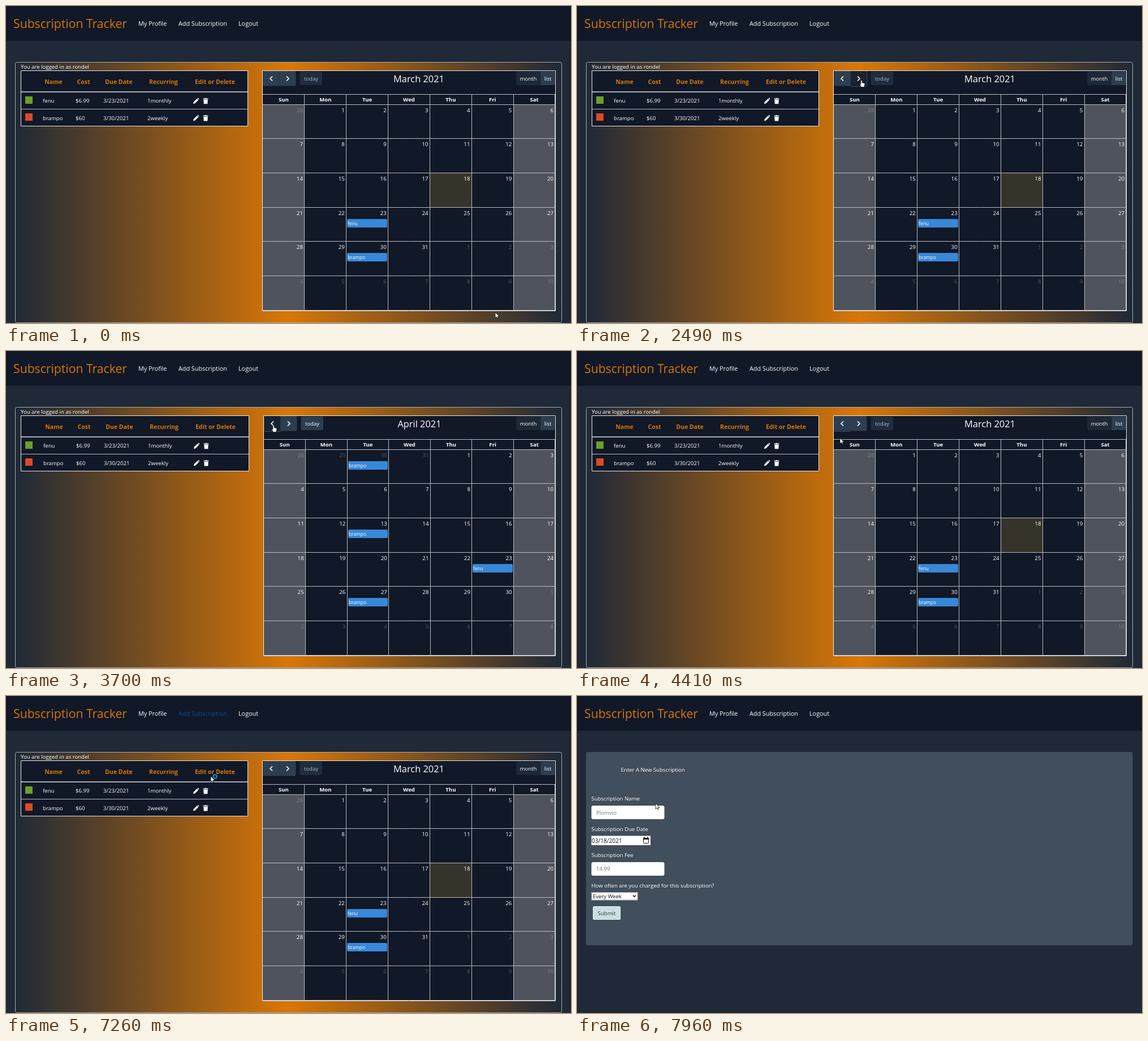
Write an HTML page with a canvas that moves like this. It is 999 px wide and 561 px high and loops after 8 s.

```html
<!DOCTYPE html>
<html lang="en">
<head>
<meta charset="utf-8">
<title>Subscription Tracker</title>
<style>
html, body { margin: 0; width: 100%; height: 100%; overflow: hidden; background: #1f2937; }
canvas { display: block; }
</style>
</head>
<body>
<canvas id="stage" width="999" height="561"></canvas>
<script>
const g = document.getElementById('stage').getContext('2d');
const LOOP = 8000;
const DARK = '#111827', ORANGE = '#d97706', LINE = '#b8bbc0', BUTTON = '#2c3e50';
const VIDEO = 'fenu', SHOP = 'brampo';

// Pointer moves: start, end, number of steps, waypoints
const moves = [
  [70, 870, 11, [[865, 542], [600, 330], [400, 190], [301, 160], [338, 154]]],
  [950, 1710, 11, [[338, 154], [420, 150], [500, 141], [531, 134], [511, 134]]],
  [1790, 1970, 3, [[511, 134], [507, 131]]],
  [2130, 2200, 2, [[507, 131], [503, 131]]],
  [2920, 3310, 6, [[503, 131], [488, 133], [473, 131]]],
  [4260, 5000, 10, [[473, 131], [465, 154], [430, 100], [405, 40], [370, 8], [327, 3]]],
  [5160, 5400, 4, [[327, 3], [343, 28]]],
  [6540, 7110, 8, [[343, 28], [335, 70], [350, 120], [362, 142]]],
  [7410, 7960, 8, [[362, 142], [139, 190]]]
];

function along(pts, p) {
  const k = p * (pts.length - 1), i = Math.min(Math.floor(k), pts.length - 2);
  return pts[i].map((v, j) => v + (pts[i + 1][j] - v) * (k - i));
}

function pointerAt(t) {
  let pos = moves[0][3][0];
  for (const [start, end, n, pts] of moves) {
    if (t < start) break;
    const step = Math.floor((t - start) / (end - start) * (n - 1) + 1e-6) + 1;
    pos = along(pts, Math.min(1, step / n));
  }
  return pos;
}

function rect(x, y, w, h, fill, r = 0) {
  g.fillStyle = fill;
  g.beginPath();
  g.roundRect(x, y, w, h, r);
  g.fill();
}

function frame(x, y, w, h, color, r = 0) {
  g.strokeStyle = color;
  g.lineWidth = 1;
  g.beginPath();
  g.roundRect(x, y, w, h, r);
  g.stroke();
}

function line(pts, color = '#fff', width = 1) {
  g.strokeStyle = color;
  g.lineWidth = width;
  g.beginPath();
  pts.forEach(([x, y]) => g.lineTo(x, y));
  g.stroke();
}

// y is the middle of the capitals; baselines sit on whole pixels
function text(s, x, y, size = 9.6, color = '#fff', align = 'left', weight = 400) {
  g.font = `${weight} ${size}px "Open Sans", "Noto Sans", sans-serif`;
  g.fillStyle = color;
  g.textAlign = align;
  g.fillText(s, x, Math.round(y + size * 0.36));
}

function shape(d, x, y, fill, stroke) {
  const path = new Path2D(d);
  g.save();
  g.translate(x, y);
  g.fillStyle = fill;
  g.fill(path);
  if (stroke) {
    g.strokeStyle = stroke;
    g.lineWidth = 0.8;
    g.stroke(path);
  }
  g.restore();
}

function nav(blue) {
  rect(0, 0, 999, 61.5, DARK);
  text('Subscription Tracker', 13, 31, 21.2, ORANGE);
  text('My Profile', 234, 31, 10.8);
  text('Add Subscription', 305, 31, 10.8, blue ? '#114a9c' : '#fff');
  text('Logout', 411, 31, 10.8);
}

function table(shift) {
  const width = 401 + shift * 2, right = 427 + shift * 2;
  rect(26, 114, width + 1, 99, DARK);
  line([[27, 152], [right, 152]], '#dcdee0', 1.4);
  line([[27, 182.5], [right, 182.5]], LINE);
  frame(26.5, 114.5, width, 98, '#e8eaec');
  const heads = [['Name', 84], ['Cost', 137], ['Due Date', 199.5], ['Recurring', 278.5], ['Edit or Delete', 369.5]];
  heads.forEach(([s, x]) => text(s, x + shift, 134, 10.5, ORANGE, 'center', 700));
  const rows = [
    ['#6d9f2b', VIDEO, '$6.99', '3/23/2021', '1monthly'],
    ['#dc4a28', SHOP, '$60', '3/30/2021', '2weekly']
  ];
  rows.forEach(([logo, ...cells], i) => {
    const y = 168 + i * 30.3;
    rect(34, Math.round(y - 8), 13, 13, logo);
    cells.forEach((s, j) => text(s, [65, 123, 172, 250][j] + shift, y));
    shape('M-5 5L-4.4 2L1.6-4L4-1.6L-2 4.4ZM2.3-4.7L3-5.2Q4-5.6 5-4.4Q5.6-3.4 5-2.7L4.6-2.3Z', 336 + shift, y, '#fff');
    shape('M-4.5-4.5H-1.6L-1-5.2H1L1.6-4.5H4.5V-3.2H-4.5ZM-3.8-2.5H3.8L3.3 5.2H-3.3Z', 353 + shift, y, '#fff');
  });
}

function calendar(month, left, hover, focus) {
  const right = 971, col = (right - left) / 7;
  const colX = c => Math.floor(left - 0.1 + c * col);
  const rowY = r => Math.floor(174.2 + r * 60.65);
  rect(left - 1, 114, right - left + 2, 426, DARK);

  // Toolbar
  ['prev', 'next'].forEach((name, i) => {
    const x = left + 0.5 + i * 29, dir = i ? -1 : 1, cx = x + 14.5;
    rect(x, 115, 29, 26.5, hover === name ? '#18232f' : BUTTON, i ? [0, 2, 2, 0] : [2, 0, 0, 2]);
    if (focus === name) frame(x - 0.5, 114.5, 30, 28, '#3b4d60', 2);
    line([[cx + 2 * dir, 124.5], [cx - 2 * dir, 128.5], [cx + 2 * dir, 132.5]], '#fff', 1.7);
  });
  g.globalAlpha = month === 2 ? 0.55 : 1;
  rect(left + 65.5, 116, 39.5, 24, BUTTON, 2);
  g.globalAlpha = month === 2 ? 0.65 : 1;
  text('today', left + 85.5, 129, 9.6, '#fff', 'center');
  g.globalAlpha = 1;
  text(month === 2 ? 'March 2021' : 'April 2021', left / 2 + 503, 129, 16.4, '#fff', 'center');
  rect(902, 116, 43.5, 24, '#1d2936', [2, 0, 0, 2]);
  rect(945.5, 116, 25, 24, BUTTON, [0, 2, 2, 0]);
  text('month', 923.5, 129, 9.5, '#fff', 'center');
  text('list', 958, 129, 9.5, '#fff', 'center');

  // Cells
  const first = 1 - new Date(2021, month, 1).getDay();
  const events = { '2-23': VIDEO, '2-30': SHOP, '3-13': SHOP, '3-23': VIDEO, '3-27': SHOP };
  for (let i = 0; i < 42; i++) {
    const c = i % 7, r = Math.floor(i / 7);
    const x = colX(c), y = rowY(r), w = colX(c + 1) - x, h = rowY(r + 1) - y;
    const day = new Date(2021, month, first + i), m = day.getMonth(), d = day.getDate();
    if (c % 6 === 0) rect(x, y, w, h, '#4f535d');
    if (m === 2 && d === 18) rect(x, y, w, h, '#36332a');
    text(d, left + (c + 1) * col - 2.8, y + 10.6, 9.8, m === month ? '#fff' : 'rgba(255,255,255,.27)', 'right');
    const event = events[m + '-' + d];
    if (event) {
      rect(x + 2, y + 21, w - 3, 15, '#3788d8', 2);
      text(event, x + 3.2, y + 29, 8.3);
    }
  }
  'Sun Mon Tue Wed Thu Fri Sat'.split(' ').forEach((s, c) =>
    text(s, left + (c + 0.5) * col, 166, 9.6, '#fff', 'center', 700));

  // Grid
  for (let c = 0; c < 8; c++) line([[colX(c) + 0.5, 156], [colX(c) + 0.5, 538]], LINE);
  for (let r = 0; r < 7; r++) line([[left, rowY(r) + 0.5], [right, rowY(r) + 0.5]], LINE);
  line([[left, 156.5], [right, 156.5]], LINE);
  frame(left - 0.5, 114.5, right - left + 1, 425, '#e8eaec');
}

function profile(t, x, y) {
  const april = t >= 2620 && t < 3940, left = april ? 456 : 454;
  const onBar = y > 114 && y < 142;
  const hover = onBar && x > left && x < left + 29 ? 'prev' : onBar && x >= left + 29 && x < left + 58 ? 'next' : '';
  const focus = t >= 2380 && t < 3630 ? 'next' : t >= 3630 && t < 6030 ? 'prev' : '';
  const link = x > 305 && x < 391 && y > 19 && y < 41;

  nav(link || t >= 6030);
  const glow = g.createLinearGradient(16, 0, 982, 0);
  glow.addColorStop(0, '#1f2937');
  glow.addColorStop(0.5, ORANGE);
  glow.addColorStop(1, '#1f2937');
  rect(16, 99, 967, 462, glow, 3);
  frame(16.5, 99.5, 966, 461, '#a9aeb4', 3);
  text('You are logged in as rondel', 26, 107.5);
  table(april ? 1 : 0);
  calendar(april ? 3 : 2, left, hover, focus);
  return hover || link;
}

function form() {
  const grey = '#6c757d';
  nav(false);
  rect(16, 99, 966.5, 342, '#414e5b', 3);
  text('Enter A New Subscription', 77.5, 131);
  text('Subscription Name', 25.5, 182);
  rect(25.5, 194, 129, 24, '#fff', 3);
  text('Plomvio', 34, 206.5, 9.6, grey);
  text('Subscription Due Date', 25.5, 236);
  rect(25.5, 247.5, 104.5, 16.5, '#fff');
  text('03/18/2021', 26, 256, 10.1, '#111');
  frame(117.5, 251.5, 9, 9, '#111', 1);
  rect(117, 251, 10, 3, '#111');
  rect(118.5, 249.5, 1.5, 2, '#111');
  rect(124, 249.5, 1.5, 2, '#111');
  text('Subscription Fee', 25.5, 282);
  rect(25.5, 294, 129, 24, '#fff', 3);
  text('14.99', 34, 306, 9.6, grey);
  text('How often are you charged for this subscription?', 25.5, 336);
  rect(25.5, 347, 82, 14.5, '#fff');
  frame(26, 347.5, 81, 13.5, '#8b9197');
  text('Every Week', 28, 355, 9.5, '#111');
  line([[99, 352.8], [101.5, 355.3], [104, 352.8]], '#111', 1.5);
  rect(28, 372, 49, 24, '#c9dfe1', 2.5);
  frame(28.5, 372.5, 48, 23, '#e2eeee', 2.5);
  text('Submit', 52.5, 384.5, 9.6, '#343a40', 'center');
}

function pointer(x, y, hand, busy) {
  if (hand) {
    shape('M-1.2 1Q0-.8 1.2 1V4.6L5 5.6Q6.2 6 6 8L5 11V12.6H-.8V11.4L-3 8.6Q-3.4 6.6-1.2 7.8Z', x, y, '#fff', '#111');
    return;
  }
  shape('M0 0V10L2.3 7.9L3.8 11L5.3 10.3L3.9 7.3H7Z', x, y, '#fff', '#111');
  if (busy) {
    g.strokeStyle = '#1c8fe0';
    g.lineWidth = 2;
    g.beginPath();
    g.arc(x + 7.5, y + 0.5, 3.2, 0, 7);
    g.stroke();
  }
}

function draw(t) {
  const [x, y] = pointerAt(t);
  const busy = t >= 6030 && t < 7480;
  let hand = false;
  rect(0, 0, 999, 561, '#1f2937');
  if (t < 7340) hand = profile(t, x, y);
  else form();
  pointer(x, y, hand && !busy, busy);
}

const begin = performance.now();
function tick() {
  draw((performance.now() - begin) % LOOP);
  requestAnimationFrame(tick);
}
tick();
</script>
</body>
</html>
```
